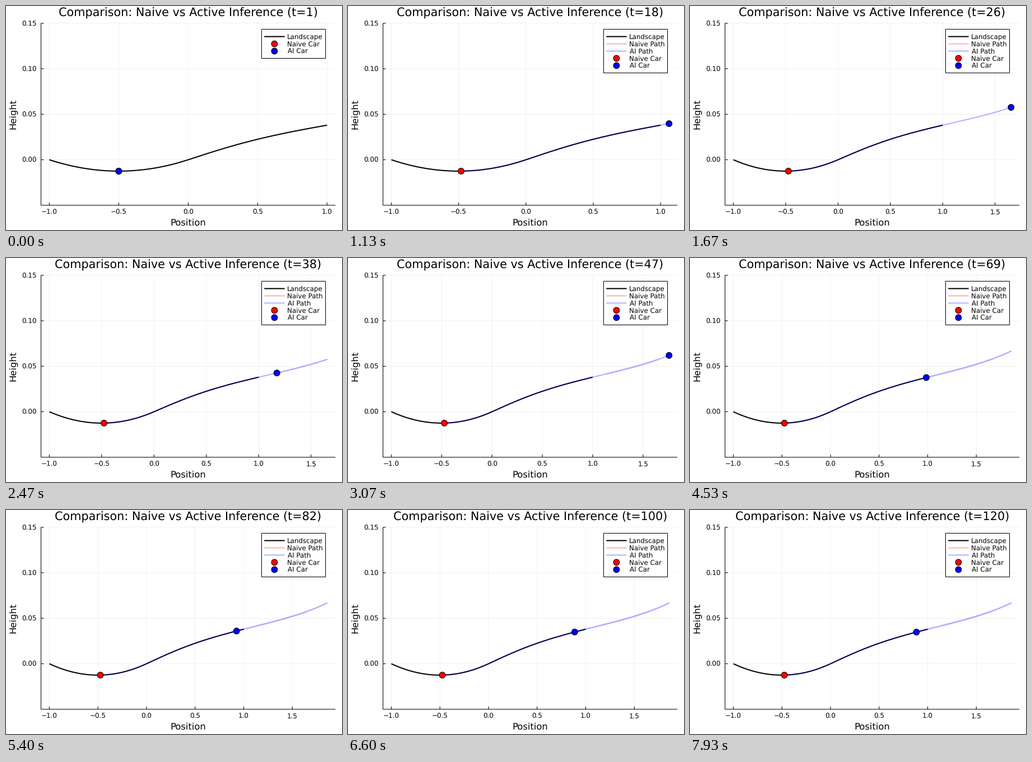
A matplotlib script for the animation above (8 s loop, 600x400 px).

```python
import numpy as np
import matplotlib.pyplot as plt
from matplotlib.animation import FuncAnimation
from matplotlib.patches import Circle, Rectangle

plt.rcParams.update({"font.family": "DejaVu Sans", "text.hinting": "none"})

STEPS = 120
TICK_MS, TICKS = 20, 400       # one loop lasts 8000 ms
PT = 0.72                      # points per pixel at 100 dpi
LEFT, RIGHT, TOP, BOTTOM = 62.5, 588.2, 30.8, 355.8
Y_MIN, Y_MAX = -0.05, 0.15
SMALL, MEDIUM, LARGE = 11.9, 16.4, 20.8
THIN, THICK = 1.05, 2.05
MARK_X = 479.4


def height(x):
    x = np.asarray(x, float)
    p = np.maximum(x, 0)
    r5 = np.sqrt(5)
    right = (1.2 / r5 * np.arcsinh(r5 * p)
             - p / (5 * np.sqrt(1 + 5 * p ** 2)) + p ** 5 / 80)
    return 0.05 * np.where(x < 0, x ** 2 + x, right)


def naive_run(n, push=0.0025, friction=0.1):
    """A weak constant push that only rocks the car in the valley."""
    x, v = -0.5, 0.0
    out = [x]
    for _ in range(n - 1):
        v += push - friction * v + 0.05 * (-2 * x - 1)
        x += v
        out.append(x)
    return np.array(out)


def smooth(t, keys, vals):
    """Cubic Hermite curve through the key points."""
    keys, vals = np.array(keys, float), np.array(vals, float)
    slope = np.gradient(vals, keys)
    i = np.clip(np.searchsorted(keys, t, side="right") - 1, 0, len(keys) - 2)
    h = keys[i + 1] - keys[i]
    s = (t - keys[i]) / h
    return ((1 + 2 * s) * (1 - s) ** 2 * vals[i]
            + s * (1 - s) ** 2 * h * slope[i]
            + s ** 2 * (3 - 2 * s) * vals[i + 1]
            + s ** 2 * (s - 1) * h * slope[i + 1])


AI_KEYS = [(1, -.5), (2, -.453), (3, -.368), (4, -.257), (6, -.014),
           (8, .19), (10, .354), (14, .667), (18, 1.063), (22, 1.47),
           (24, 1.597), (25, 1.635), (26, 1.653), (27, 1.637), (29, 1.55),
           (32, 1.33), (36, 1.13), (40, 1.28), (44, 1.58), (47, 1.7584),
           (49, 1.845), (50, 1.8577), (51, 1.84), (53, 1.715), (57, 1.3646),
           (60, 1.17), (65, 1.035), (72, .965), (82, .926), (95, .893),
           (108, .882), (120, .8836)]

naive = naive_run(STEPS)
active = smooth(np.arange(1, STEPS + 1), *zip(*AI_KEYS))
ground = np.linspace(-1, 1, 201)


def to_y(h):
    return BOTTOM - (h - Y_MIN) / (Y_MAX - Y_MIN) * (BOTTOM - TOP)


def x_scale(x_max):
    """Data to pixels, with 3 % padding on both sides."""
    span = x_max + 1
    lo, width = -1 - 0.03 * span, 1.06 * span
    return lambda x: LEFT + (np.asarray(x) - lo) / width * (RIGHT - LEFT)


fig = plt.figure(figsize=(6, 4), dpi=100, facecolor="white")
ax = fig.add_axes([0, 0, 1, 1])
ax.set_xlim(0, 600)
ax.set_ylim(400, 0)
ax.axis("off")


def line(xs, ys, color="black", width=THIN, z=2, **kw):
    return ax.plot(xs, ys, color=color, lw=width * PT, zorder=z, snap=False,
                   solid_capstyle="butt", solid_joinstyle="round", **kw)[0]


def dot(x, color, z):
    return ax.add_patch(Circle((x, 0), 5.4, fc=color, ec="black",
                               lw=THIN * PT, zorder=z))


def label(x, y, s, size=SMALL, ha="left", z=5, **kw):
    return ax.text(x, y, s, fontsize=size * PT, ha=ha, va="baseline",
                   color="black", zorder=z, **kw)


GRID = dict(width=0.55, alpha=0.1, z=1)

# vertical axis
for h in (0, 0.05, 0.10, 0.15):
    y = to_y(h)
    line([LEFT, RIGHT], [y, y], **GRID)
    line([LEFT, LEFT + 5], [y, y])
    label(54.6, y + 4.7, f"{h:.2f}", ha="right")
line([LEFT, LEFT], [TOP, BOTTOM])
line([LEFT, RIGHT], [BOTTOM, BOTTOM])

# horizontal axis, moved as the range grows
x_ticks = []
for v in np.arange(-1, 2, 0.5):
    name = f"{v:.1f}".replace("-", "\u2212")
    x_ticks.append((v, line([0, 0], [TOP, BOTTOM], **GRID),
                    line([0, 0], [BOTTOM, BOTTOM - 5]),
                    label(0, 372, name, ha="center")))

title = label(325.3, 19, "", LARGE, "center")
label(325.3, 392, "Position", MEDIUM, "center")
label(17.2, 193.3, "Height", MEDIUM, "center", rotation=90,
      rotation_mode="anchor")

# curves and cars
land = line([], [], "black", THICK, 3)
naive_path = line([], [], "red", THICK, 3.1, alpha=0.3)
ai_path = line([], [], "blue", THICK, 3.2, alpha=0.3)
naive_car = dot(0, "red", 3.3)
ai_car = dot(0, "blue", 3.4)

# legend
frame = ax.add_patch(Rectangle((456.4, 41.5), 114.2, 78, fc="white",
                               ec="black", lw=THIN * PT, zorder=6,
                               snap=False))


def key_line(color, alpha):
    return line([461.2, 497.6], [0, 0], color, THICK, 7, alpha=alpha)


entries = [(key_line("black", 1), label(502, 0, "Landscape", z=7)),
           (key_line("red", 0.3), label(502, 0, "Naive Path", z=7)),
           (key_line("blue", 0.3), label(503, 0, "AI Path", z=7)),
           (dot(MARK_X, "red", 7), label(502, 0, "Naive Car", z=7)),
           (dot(MARK_X, "blue", 7), label(503, 0, "AI Car", z=7))]


def lay_legend(with_paths):
    row = 0
    for i, (mark, text) in enumerate(entries):
        shown = with_paths or i not in (1, 2)
        mark.set_visible(shown)
        text.set_visible(shown)
        if shown:
            y = 54.6 + 12.95 * row
            if isinstance(mark, Circle):
                mark.center = MARK_X, y
            else:
                mark.set_ydata([y, y])
            text.set_y(y + 4)
            row += 1
    frame.set_height(13 * (row + 1))


def update(k):
    # fifteen steps a second, started on the nearest hundredth
    n = int((TICK_MS * k + 15) * 15 / 1000) + 1
    n = min(n, STEPS)
    to_x = x_scale(max(1.0, active[:n].max()))
    for v, grid, tick, text in x_ticks:
        x = float(to_x(v))
        shown = x <= RIGHT
        for part in (grid, tick):
            part.set_xdata([x, x])
            part.set_visible(shown)
        text.set_x(x)
        text.set_visible(shown)

    land.set_data(to_x(ground), to_y(height(ground)))
    for path, car, xs in ((naive_path, naive_car, naive[:n]),
                          (ai_path, ai_car, active[:n])):
        px, py = to_x(xs), to_y(height(xs))
        path.set_data(px, py)
        path.set_visible(n > 1)
        car.center = px[-1], py[-1]

    lay_legend(n > 1)
    title.set_text(f"Comparison: Naive vs Active Inference (t={n})")
    return []


anim = FuncAnimation(fig, update, frames=TICKS, interval=TICK_MS,
                     init_func=lambda: update(0), repeat=True, blit=False)
plt.show()
```
